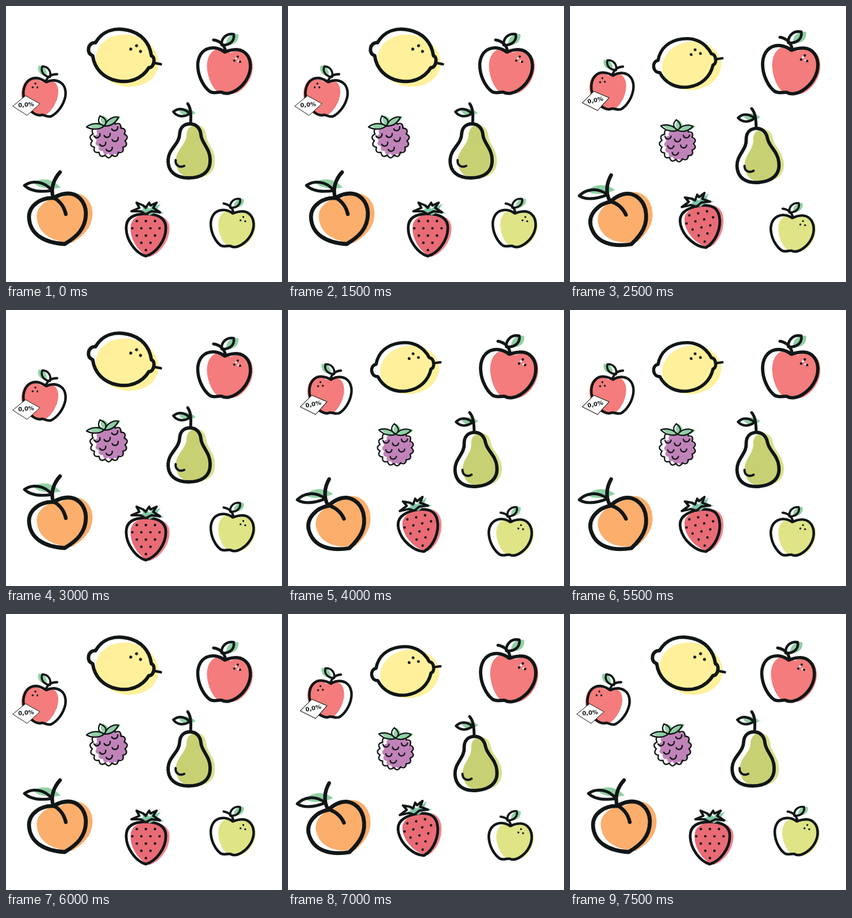
Recreate the animation shown at these times as an HTML page with a canvas. Size 480 by 480 pixels, loop 8000 ms.

```html
<!DOCTYPE html>
<html lang="en">
<head>
<meta charset="utf-8">
<title>Fruit</title>
<style>
html, body { margin: 0; width: 100%; height: 100%; overflow: hidden; background: #fff; }
canvas { display: block; width: 480px; height: 480px; }
</style>
</head>
<body>
<canvas id="stage" width="480" height="480"></canvas>
<script>
const ctx = document.getElementById('stage').getContext('2d');
const INK = '#111616', LEAF = '#8fd0a3';
const LOOP = 8000, STEP = 500, POSES = [0, 0.5, 1];
const rad = deg => deg * Math.PI / 180;

function group(draw) {
  ctx.save();
  draw();
  ctx.restore();
}

function line(d, width) {
  ctx.lineWidth = width;
  ctx.stroke(new Path2D(d));
}

// Colour patch: the path scaled about (cx, cy), then shifted.
function patch(d, color, dx = 0, dy = 0, sx = 1, sy = 1, cx = 0, cy = 0) {
  group(() => {
    ctx.translate(cx + dx, cy + dy);
    ctx.scale(sx, sy);
    ctx.translate(-cx, -cy);
    ctx.fillStyle = color;
    ctx.fill(new Path2D(d));
  });
}

function dot(x, y, r, color = INK) {
  ctx.fillStyle = color;
  ctx.beginPath();
  ctx.arc(x, y, r, 0, 7);
  ctx.fill();
}

function lemon() {
  ctx.rotate(rad(12));
  ctx.fillStyle = '#fff09b';
  ctx.beginPath();
  ctx.ellipse(10.5, 7, 55, 45, 0, 0, 7);
  ctx.fill();
  line('M-50-12C-42-36-22-45 0-45C24-45 42-32 50-10C58-9 59 9 50 11C42 33 22 45 0 45C-22 45-42 34-50 11C-63 10-63-11-50-12Z', 6);
  line('M57 1L69 1', 4.5);
  dot(21, -21.8, 2.6);
  dot(12.4, -13.9, 2.6);
  dot(29.8, -13.5, 2.6);
}

function apple(color, shine) {
  const body = 'M380 80C370 72 358 71 349 75C336 81 332 96 334 110C336 126 345 142 355 149C362 153 369 149 375 150C382 154 392 152 401 146C415 137 426 120 425 102C424 86 414 77 403 76C394 75 387 78 380 80Z';
  const leaf = 'M375 68C374 57 382 47 396 49C398 59 391 69 375 68Z';
  ctx.translate(-380, -112);
  patch(body, color, 10, 1, 0.87, 0.99, 379.5, 113);
  patch(leaf, LEAF, 8, 0);
  line(body, 5.5);
  line('M382 80C381 70 374 61 361 59', 5);
  line(leaf, 4.5);
  if (shine) {
    dot(400, 91, 1.8, '#fff');
    dot(404.5, 96, 1.8, '#fff');
  }
  dot(403, 88, 2.1);
  dot(397, 95, 2.1);
  dot(407, 97, 2.1);
}

function taggedApple() {
  group(() => {
    ctx.rotate(rad(12));
    ctx.scale(-0.8, 0.82);
    apple('#f47c7c');
  });
  const card = new Path2D('M-53 16L-31-2L-6 12L-28 32Z');
  ctx.fillStyle = '#fff';
  ctx.fill(card);
  ctx.lineWidth = 1;
  ctx.stroke(card);
  ctx.translate(-30, 14.5);
  ctx.rotate(rad(-5));
  ctx.font = 'bold 10px "DejaVu Sans", sans-serif';
  ctx.textAlign = 'center';
  ctx.textBaseline = 'middle';
  ctx.fillStyle = INK;
  ctx.fillText('0,0%', 0, 0);
}

function greenApple() {
  ctx.scale(0.815, 0.81);
  apple('#dfe487');
}

function raspberry() {
  ctx.rotate(rad(-18));
  const n = 15;
  const at = (i, r) => [r * Math.cos(i / n * 2 * Math.PI), r * Math.sin(i / n * 2 * Math.PI)];
  const bumps = new Path2D();
  bumps.moveTo(...at(0, 28.5));
  for (let i = 0; i < n; i++) bumps.quadraticCurveTo(...at(i + 0.5, 37), ...at(i + 1, 28.5));
  bumps.closePath();
  group(() => {
    ctx.translate(4.5, 1);
    ctx.scale(0.88, 0.92);
    ctx.fillStyle = '#c083b9';
    ctx.fill(bumps);
  });
  ctx.lineWidth = 2.4;
  ctx.stroke(bumps);
  for (const [x, y] of [[-17, -14], [16, -16], [0, -9], [-12, 3], [11, 2], [-4, 15]]) {
    ctx.beginPath();
    ctx.arc(x, y, 5.5, 0.1, 3);
    ctx.stroke();
  }
  const leaves = 'M0-24C-10-20-22-24-30-32C-20-36-8-33 0-24ZM0-24C10-20 20-23 28-31C20-36 8-33 0-24ZM0-24C-10-31-8-37-2-43C5-37 9-31 0-24Z';
  patch(leaves, '#fff');
  patch(leaves, LEAF, 4, 0);
  line(leaves, 2.4);
}

function pear() {
  const body = 'M320 205C331 205 338 213 339 224C340 238 355 248 355 267C356 289 340 299 318 299C296 299 281 289 282 267C283 248 302 240 302 222C303 211 310 205 320 205Z';
  const leaf = 'M291 184C300 177 310 178 320 187C309 194 298 193 291 184Z';
  ctx.translate(-318, -235);
  patch(body, '#dadf90', 11, 1, 0.93, 0.98, 318, 252);
  group(() => {
    ctx.clip(new Path2D(body));
    patch(body, '#c8d074', 11, 1, 0.93, 0.98, 318, 252);
  });
  patch(leaf, LEAF, 10, -1);
  line(body, 5.8);
  line('M321 204C322 190 322 178 316 170', 5);
  line(leaf, 4.4);
  line('M295 268C294 277 302 282 310 278', 4);
}

function peach() {
  const body = 'M82 334C62 333 40 346 40 367C41 398 68 412 102 414C122 402 139 388 139 360C138 339 124 326 108 326C96 326 88 331 82 334Z';
  const leaf = 'M32 312C46 303 66 304 80 321C60 324 42 322 32 312Z';
  ctx.translate(-90, -368);
  patch(body, '#fcae6c', 12.5, -1, 0.98, 0.98, 90, 370);
  patch(leaf, LEAF, 15, -5);
  line(body, 6.8);
  line('M104 362C101 348 92 338 82 333C77 316 84 300 94 289', 6.4);
  line(leaf, 5);
}

function strawberry() {
  const body = 'M243 435C226 430 209 408 209 386C209 368 222 362 243 361C264 362 278 368 278 386C278 408 261 430 243 435Z';
  const crown = 'M218 357L232 351L227 342L239 347L243 351L249 342L251 347L262 342L256 351L268 359L253 357L243 362L234 357Z';
  ctx.translate(-243, -398);
  patch(body, '#f08488', 7, 1, 0.98, 1, 243, 398);
  group(() => {
    ctx.clip(new Path2D(body));
    patch(body, '#e96b76', 7, 1, 0.98, 1, 243, 398);
  });
  line(body, 4.8);
  patch(crown, '#fff');
  patch(crown, '#7fc6a9', 7, 2);
  line(crown, 4);
  [3, 4, 3, 2, 1].forEach((n, row) => {
    for (let i = 0; i < n; i++) dot(243.3 + (i - (n - 1) / 2) * 15.8, 374 + row * 12.6, 2.2);
  });
}

// Rest centre, swung centre, turn in degrees, scale when swung.
const fruits = [
  { draw: lemon, from: [202, 86], to: [201, 99], turn: -20, size: 0.935 },
  { draw: () => apple('#f47c7c', true), from: [380, 112], to: [383.5, 110.5], turn: 1.7, size: 1.05 },
  { draw: taggedApple, from: [65, 158], to: [72.5, 147], turn: -6, size: 1 },
  { draw: raspberry, from: [178.5, 231.5], to: [187, 239.5], turn: 18, size: 0.97 },
  { draw: pear, from: [318, 235], to: [323.5, 243], turn: -5, size: 1 },
  { draw: peach, from: [90, 368], to: [85, 372], turn: -12.7, size: 1 },
  { draw: strawberry, from: [243, 398], to: [228, 384], turn: -13, size: 1 },
  { draw: greenApple, from: [394, 386.5], to: [387.5, 394.5], turn: -3, size: 1 }
];

function render(t) {
  const k = POSES[Math.floor((t % LOOP) / STEP) % POSES.length];
  const mix = (a, b) => a + (b - a) * k;
  ctx.fillStyle = '#fff';
  ctx.fillRect(0, 0, 480, 480);
  ctx.strokeStyle = INK;
  ctx.lineCap = ctx.lineJoin = 'round';
  for (const { draw, from, to, turn, size } of fruits) {
    group(() => {
      ctx.translate(mix(from[0], to[0]), mix(from[1], to[1]));
      ctx.rotate(rad(turn * k));
      ctx.scale(mix(1, size), mix(1, size));
      draw();
    });
  }
}

const start = performance.now();
function frame() {
  render(performance.now() - start);
  requestAnimationFrame(frame);
}
frame();
</script>
</body>
</html>
```
